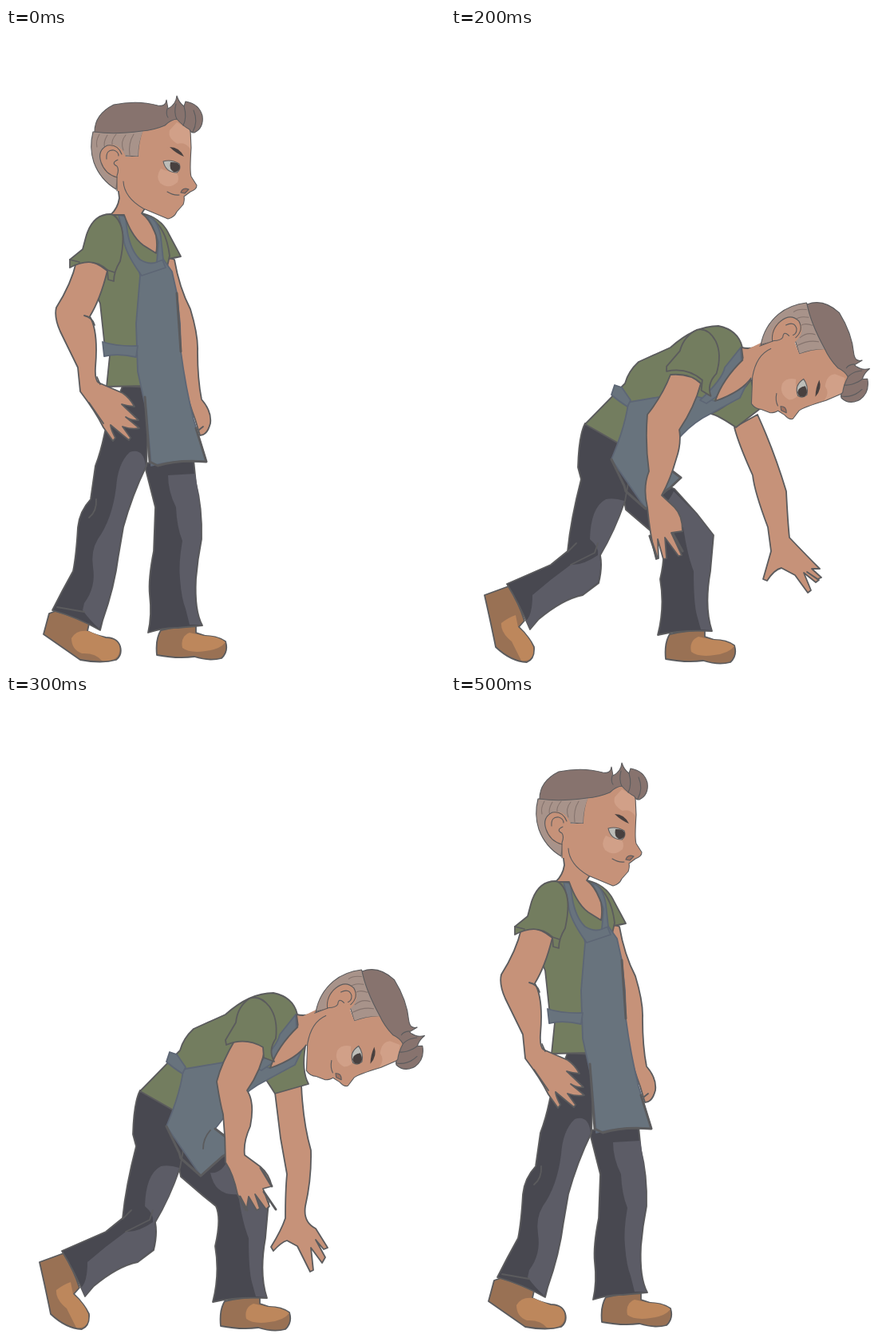
An HTML page that plays this animation: 550 by 800 pixels, repeating every 0.6 s.

```html
<!DOCTYPE html>
<html lang="en">
<head>
<meta charset="utf-8">
<title>Bending down</title>
<style>
html, body { margin: 0; width: 100%; height: 100%; overflow: hidden; background: #fff; }
svg { display: block; width: 100%; height: 100%; }
path { stroke: #5b5b5d; stroke-width: 1.8; stroke-linejoin: round; stroke-linecap: round; }
.skin { fill: #c69279; }
.glow { fill: #d1a088; stroke: none; }
.shirt { fill: #737d5f; }
.apron { fill: #68737d; stroke: #5d6675; }
.dark { fill: #484850; }
.light { fill: #5c5c66; stroke: none; }
.shoe { fill: #997154; }
.toe { fill: #bd875c; stroke: none; }
.hair { fill: #87736e; }
.side { fill: #a8938a; }
.line { fill: none; }
.ink { fill: #48403f; stroke: none; }
.fold { fill: none; stroke-width: 3; }
.plain { stroke: none; }
#head path { stroke-width: 1.1; }
.pose { display: none; }
.pose.on { display: inline; }
</style>
</head>
<body>
<svg viewBox="0 0 550 800" preserveAspectRatio="none">
<defs>
  <g id="head">
    <path class="side" d="M109 130Q104 150 110 168Q118 190 138 202L140 180 150 160 166 161Q166 142 173 128Z"/>
    <path class="line" style="stroke:#85736d" d="M117 133Q112 142 114 149M127 134Q121 144 124 151M138 133Q132 140 133 146M150 134Q143 142 147 153M160 133Q153 144 155 159"/>
    <path class="skin plain" d="M172 128Q166 142 166 161L150 161Q144 146 131 146Q117 150 118 165Q120 183 138 188L139 204 148 204Q155 217 172 226L203 239Q211 237 214 230L222 221Q224 215 223 211L231 205Q239 202 239 197L232 186Q230 180 232 150L231 128 214 112Z"/>
    <path class="glow" d="M205 128Q202 138 215 145Q225 142 231 152L231 128 214 118Z"/>
    <path class="glow" d="M194 176Q187 186 193 194Q204 203 215 193Q218 184 212 180Q201 180 194 176Z"/>
    <path class="line" d="M147 192Q148 212 172 226L203 239Q211 237 214 230L222 221Q224 215 223 211L231 205Q239 202 239 197L232 186Q230 180 232 150L231 128"/>
    <path class="skin" d="M145 158Q140 145 127 147Q114 153 119 168Q124 183 139 187"/>
    <path class="line" d="M126 164Q125 152 135 153Q141 155 141 160M140 165Q131 169 139 173Q142 177 139 185V204"/>
    <path class="hair" d="M111 130Q111 108 135 96Q165 90 190 97Q200 99 201 90L203 101Q213 96 214 85Q217 94 223 98L225 92Q242 95 246 110Q248 125 236 131Q231 131 230 127Q222 123 214 114Q206 115 199 122Q185 128 170 129Q135 134 111 130Z"/>
    <path class="line" d="M202 101Q200 108 203 112M213 95Q210 106 214 114M223 98Q227 112 222 122M235 103Q241 117 234 130"/>
    <path class="ink" d="M205 149Q217 149 223 161Q213 157 205 149Z"/>
    <path d="M197 167Q207 164 217 170Q220 177 214 181Q200 181 197 167Z" fill="#bdbdb8"/>
    <path class="ink" d="M206 168Q217 167 218 174Q217 181 210 180Q204 177 206 168Z"/>
    <path class="line" d="M202 205Q210 210 217 209"/>
    <path d="M219 206Q221 199 229 202L224 207Z" fill="#a0705e"/>
  </g>
  <g id="frontShoe">
    <path class="shoe" d="M194 754Q187 765 189 785Q215 790 236 787Q255 793 270 789Q279 781 275 768Q265 761 250 761L238 757 238 749Q215 749 194 754Z"/>
    <path class="toe" d="M230 757Q218 762 221 776Q230 783 250 780Q268 778 275 769Q265 761 248 761Z"/>
  </g>
  <g id="bentBody">
    <use href="#frontShoe" x="80" y="5"/>
    <path class="shoe" d="M42 710Q50 745 56 775Q75 793 95 794Q105 790 104 775Q98 762 85 750L92 742Q85 720 72 699Z"/>
    <path class="toe" d="M81 735Q72 738 63 745Q62 757 76 768Q82 780 88 792Q105 794 103 775Q98 762 84 750Z"/>
    <path class="dark" d="M208 545L219 603 247 627 263 640Q270 655 262 690Q268 725 259 760Q290 753 327 755Q317 725 325 680L329 635 308 608 280 577Z"/>
    <path class="light" d="M256 598Q262 628 291 625Q296 660 304 680Q304 720 308 735L313 753 326 754Q316 725 324 680L328 635 307 608 279 580Q270 600 256 598Z"/>
    <path class="dark" d="M168 495Q160 510 159 550L163 565Q150 615 146 655L125 672 70 696Q85 720 99 753L110 740Q140 715 165 710L185 695Q190 675 187 660Q205 630 218 592L222 570 210 520Z"/>
    <path class="light" d="M194 590Q175 600 174 640Q186 650 184 660Q165 673 150 672Q125 690 102 710Q102 735 94 742L99 752 110 739Q140 714 165 709L184 694Q189 675 186 660Q205 630 217 592Q205 588 194 590Z"/>
    <path class="line" d="M184 645L180 657 150 672M146 656L157 645"/>
    <path class="shirt" d="M365 400Q360 378 335 373Q305 373 275 400L235 418Q222 430 218 445L168 496 210 520 260 500 340 462Q365 440 365 400Z"/>
    <path class="apron" d="M225 468Q260 462 290 457L330 467Q350 462 370 446L362 463Q345 472 325 483Q300 495 280 520L262 543 288 563 244 602 201 540Q218 500 222 470Z"/>
    <path class="apron" d="M205 447L214 450 225 466 221 474Q207 465 201 459Z"/>
    <path class="apron" d="M363 400L364 418Q350 435 338 458L320 470 312 466Q340 440 343 425Z"/>
    <path class="fold" d="M201 540L217 573 219 580 244 602 272 577M262 543L288 563 273 577"/>
    <path class="line" d="M256 545Q247 555 247 568"/>
    <path class="skin" d="M405 385Q385 405 364 400L366 415Q340 440 331 467Q365 455 377 437"/>
    <path class="skin plain" d="M403 387L372 402 366 415 376 438 400 450 415 398Z"/>
    <use href="#head" transform="translate(290 211) rotate(69.4 130 165)"/>
  </g>
  <path id="bentSleeve" class="shirt" d="M305 380Q290 390 288 410L275 432 276 438Q300 428 322 441L323 454 336 459Q328 445 338 430Q341 405 330 390Q318 375 305 380Z"/>
</defs>

<g class="pose">
  <path class="skin" d="M196 285L211 290Q217 325 231 352Q241 385 240 405Q240 440 245 465Q258 480 256 495Q252 510 243 510L237 490Q222 450 220 420L205 335Z"/>
  <path class="line" d="M242 503L247 499"/>
  <path class="shirt" d="M171 232Q195 238 204 258L219 286Q205 289 196 290L187 270Z"/>
  <path class="shoe" d="M54 733L47 759Q70 775 93 791Q120 796 138 791Q146 785 143 774Q139 763 125 763Q112 760 102 755L104 746Q80 735 62 730Z"/>
  <path class="toe" d="M103 755Q88 753 82 764Q82 778 95 783Q112 782 120 792Q145 794 142 774Q139 764 125 764Z"/>
  <use href="#frontShoe"/>
  <path class="dark" d="M173 545L187 600 185 655Q178 690 180 710Q183 735 178 757Q200 750 215 751L246 748Q236 730 238 690Q240 665 245 640Q246 600 238 570L235 540Z"/>
  <path class="light" d="M203 560Q203 580 213 600Q214 625 221 642Q216 670 218 690Q220 715 225 727L230 747 245 747Q235 730 237 690Q239 665 244 640Q245 600 237 558Z"/>
  <path class="dark" d="M124 505Q119 530 112 548L106 590Q92 605 90 625Q88 660 84 680Q70 705 58 729Q90 738 118 754L121 742Q136 700 141 660L147 625Q158 585 176 548L180 450 146 448Z"/>
  <path class="light" d="M155 531Q140 545 138 575Q133 615 115 640Q106 655 109 675Q113 700 98 720L96 729Q107 744 117 752L120 742Q135 700 140 660L146 625Q157 585 175 548Q172 525 155 531Z"/>
  <path class="line" d="M113 590Q114 605 104 613M64 725L98 731"/>
  <path class="shirt" d="M131 234L175 234Q200 245 205 285L176 420 174 448 126 449 130 410 123 392 118 345 112 330 112 260Z"/>
  <path class="apron" d="M166 300Q185 300 196 288L208 305 214 332 218 370 219 405Q225 450 235 490L251 543Q215 540 182 548L176 480 165 430 163 370 168 310Z"/>
  <path class="fold" d="M174 462L180 543 190 548Q215 540 251 543L238 501M214 332L219 405"/>
  <path class="apron" d="M141 234L150 236Q152 275 168 290Q185 300 195 288L200 300 170 310Q148 280 147 262Z"/>
  <path class="apron" d="M177 236Q190 238 194 262L197 290 189 293 191 268Q185 250 177 236Z"/>
  <path class="apron" d="M121 393Q140 399 165 398L163 412Q140 407 123 411Z"/>
  <path class="skin" d="M139 190L142 213Q140 226 131 234L148 234Q158 262 172 272L188 282Q190 272 188 260Q181 240 170 232L174 226 148 192"/>
  <use href="#head"/>
  <path class="skin" d="M88 293Q82 320 63 350Q60 362 68 380L90 425 93 455Q112 480 122 500L134 517 137 513Q131 502 131 497L143 507 154 516 156 513 146 499Q158 503 167 501L150 487Q158 492 166 491L145 471Q152 473 161 474Q155 463 146 457L116 444Q111 440 112 425Q116 380 105 361Q118 340 127 304Q108 288 88 293Z"/>
  <path class="line" d="M98 360Q108 362 111 372M114 437L118 446M104 469L122 495"/>
  <path class="shirt" d="M131 233Q108 233 100 262L96 277 80 290 80 300Q108 285 127 303L128 315 135 317Q135 305 143 292Q150 260 143 245Q138 234 131 233Z"/>
  <path class="line" d="M80 290L92 293M127 303L136 306"/>
</g>

<g class="pose">
  <path class="skin" d="M305 368L320 360Q320 410 326 440Q325 480 317 500L316 530Q320 560 317 572Q305 582 298 582L291 575Q280 570 285 565L275 550Q272 535 278 530L289 524Q289 490 291 470Q290 440 295 410Z"/>
  <path class="line" d="M278 532Q290 538 300 533M277 549Q288 553 302 547M286 565Q294 567 304 560"/>
  <path class="shoe" d="M47 717L36 739Q55 765 73 780Q85 793 108 793Q125 790 124 778Q118 764 104 764Q92 760 88 757L92 744Q75 728 58 718Z"/>
  <path class="toe" d="M88 756Q78 744 70 747Q64 762 79 771Q94 776 100 792Q125 792 123 778Q117 765 104 765Z"/>
  <use href="#frontShoe" x="42" y="2"/>
  <path class="dark" d="M195 555L214 600 216 640Q222 680 218 710Q221 735 220 760Q245 752 260 752L286 749Q275 735 274 710Q272 680 274 655L277 632Q268 590 250 550Z"/>
  <path class="light" d="M222 556Q232 590 231 610L254 618Q248 650 253 690Q250 720 256 735L272 751 285 748Q274 735 273 710Q271 680 273 655L276 632Q268 590 250 556Z"/>
  <path class="line" d="M214 610L236 611 253 616"/>
  <path class="dark" d="M140 478Q136 500 142 520L136 555Q130 590 122 612Q108 640 94 662L56 713Q85 730 107 752Q120 730 122 708Q150 670 166 640L170 620Q185 590 195 560L204 500 200 480Z"/>
  <path class="light" d="M172 545Q160 560 160 580L150 612 156 626Q125 645 121 675Q118 700 95 720Q92 738 107 751Q119 730 121 708Q149 670 165 640L169 620Q185 590 194 558L198 543Q185 550 172 545Z"/>
  <path class="line" d="M126 612L138 614M150 612L156 626"/>
  <path class="shirt" d="M292 286Q270 280 245 300L205 340 186 388 191 396 190 420 180 435 165 475 200 487 230 470 285 400 300 373Q320 350 320 320Z"/>
  <path class="shirt" d="M319 319Q327 330 325 345L332 355 321 354 300 373 310 340Z"/>
  <path class="apron" d="M270 372Q300 378 318 350L321 356Q308 380 302 400L285 430 262 470 252 490 268 552Q230 558 199 556Q194 540 200 490L207 450 225 425 264 385Z"/>
  <path class="fold" d="M253 490L270 553Q230 558 199 556L198 535"/>
  <path class="line" d="M253 490L244 517"/>
  <path class="apron" d="M288 297L298 305Q292 325 281 345Q275 368 278 374L268 380Q266 365 278 340Q288 320 288 297Z"/>
  <path class="apron" d="M318 326Q318 345 300 373L308 372Q322 352 323 346Z"/>
  <path class="apron" d="M187 420Q200 432 220 437L225 424 217 449Q200 440 182 432Z"/>
  <path class="skin" d="M321 267Q318 280 290 287L299 301Q291 330 297 352L304 365Q317 345 318 318"/>
  <path class="skin plain" d="M320 268L318 318 328 330 340 268Z"/>
  <use href="#head" transform="translate(202 77) rotate(41 130 165)"/>
  <path class="skin" d="M200 331Q185 345 155 365L151 385Q148 430 141 465Q139 475 146 495L148 540 152 542 157 520 162 542 167 544 169 520 178 543 182 543 179 517 186 517Q190 510 187 502Q184 480 165 465Q168 440 190 410Q193 395 187 388Q210 365 238 348Q225 335 200 331Z"/>
  <path class="fold" d="M142 475Q141 490 147 510M184 484L189 516"/>
  <path class="shirt" d="M265 283Q248 287 238 302Q220 315 203 318L200 329Q225 335 237 348L236 362 244 366Q247 353 268 342Q288 322 286 306Q282 288 265 283Z"/>
  <path class="line" d="M237 348L246 350"/>
</g>

<g class="pose">
  <path class="skin" d="M355 500L384 484Q405 530 420 580Q422 620 424 638Q445 660 462 677L452 677 464 688 459 690 446 681 461 691 457 694 442 682 451 704 447 707 431 685 414 676Q405 678 396 692L391 690 401 655 397 625Q380 580 378 560Q360 520 355 500Z"/>
  <path class="shirt" d="M376 440Q382 470 388 476L357 500Q335 485 326 483Q355 470 376 440Z"/>
  <use href="#bentBody"/>
  <path class="skin" d="M275 434Q265 460 246 484Q243 520 248 555Q240 575 246 600Q250 640 257 665L260 664 259 640 266 665 270 664 268 638 285 661 289 660 276 632 290 630Q290 610 280 600L264 585Q275 565 282 540Q289 520 286 503Q305 475 313 445Q300 432 275 434Z"/>
  <path class="fold" d="M249 636L258 663M278 633L290 655"/>
  <use href="#bentSleeve" transform="rotate(10 320 400)"/>
</g>

<g class="pose">
  <path class="skin" d="M337 498L370 488Q372 535 382 570Q383 605 375 640Q372 660 388 668L403 692 398 694 388 682 400 704 396 711 382 692 385 720 381 722 365 690 352 683Q345 685 335 696L332 691Q345 670 350 655Q350 620 352 600L344 555Z"/>
  <path class="shirt" d="M375 440Q370 470 379 487L337 499Q325 480 324 480Z"/>
  <use href="#bentBody"/>
  <path class="skin" d="M288 430Q270 460 264 484Q268 510 272 525Q275 555 275 585Q285 600 290 625L300 645 302 640 304 628 314 645 318 643 312 625 326 644 330 640 322 618 333 615Q330 600 318 590L299 576Q297 560 306 540Q312 510 302 495Q320 470 325 440Q305 430 288 430Z"/>
  <path class="fold" d="M293 628L302 645M319 592L333 615M323 622L338 644"/>
  <use href="#bentSleeve"/>
</g>
</svg>
<script>
const poses = document.querySelectorAll(".pose");
const order = [0, 1, 2, 3, 1, 0];
const hold = 100;
const start = performance.now();

function draw(now) {
  const step = Math.floor(Math.max(0, now - start) / hold) % order.length;
  poses.forEach((pose, i) => pose.classList.toggle("on", i === order[step]));
  requestAnimationFrame(draw);
}
draw(start);
</script>
</body>
</html>
```
